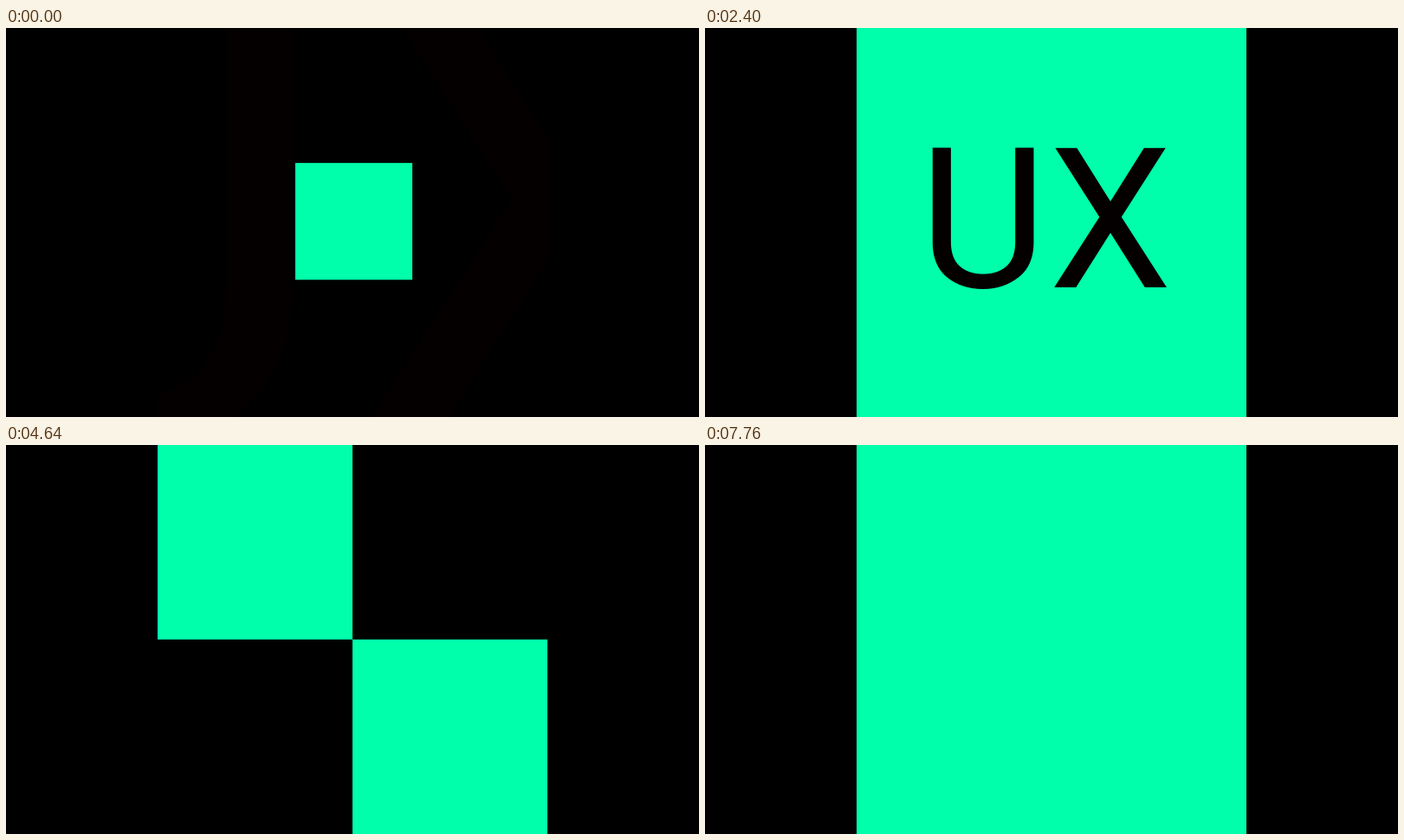
An HTML page for the animation above (8.16 s loop, 800 px wide and 450 px high).

```html
<!DOCTYPE html>
<html lang="da">
<head>
<meta charset="utf-8">
<title>UX</title>
<style>
  html, body { margin: 0; width: 100%; height: 100%; overflow: hidden; background: #000; }
  svg { display: block; width: 100vw; height: 100vh; }
  .title { font: 400 200px Roboto, sans-serif; text-anchor: middle; fill: #040000; }
  .word { font: 500 80px "Noto Sans", sans-serif; }
</style>
</head>
<body>
<svg viewBox="0 0 800 450">
  <clipPath id="stage"><rect x="175" width="450" height="450"/></clipPath>
  <g clip-path="url(#stage)">
    <rect id="square" fill="#00ffaa"/>
    <rect id="topRight"/>
    <rect id="bottomLeft"/>
    <text id="u" class="title" x="330" y="291.5">U</text>
    <text id="x" class="title" x="460.5" y="291.5">X</text>
    <text id="upper" class="word" y="143" text-anchor="end">Klik</text>
    <text id="lower" class="word" y="364" text-anchor="middle">nu</text>
  </g>
</svg>
<script>
const LOOP = 8160, GREEN = '#00ffaa', HALF = 225;
const el = id => document.getElementById(id);
const set = (id, attrs) => {
  for (const name in attrs) el(id).setAttribute(name, attrs[name]);
};
const progress = (t, start, length) => Math.min(1, Math.max(0, (t - start) / length));
const smooth = p => p * p * (3 - 2 * p);
const out = (p, power) => 1 - (1 - p) ** power;

function drawSquare(t) {
  const size = t < 2400 ? 135 + 0.1345 * t : 460;
  set('square', { x: 401.5 - size / 2, y: 223.7 - size / 2, width: size, height: size });
}

// Each letter shrinks around its own anchor, then slides out sideways.
function drawTitle(t) {
  const scale = 1 + 3.02 * (1 - smooth(progress(t, 0, 2750)));
  const slide = 245 * smooth(progress(t, 3690, 930));
  const display = t < 4620 ? 'inline' : 'none';
  const place = (id, anchor, dx) => set(id, {
    display,
    transform: `translate(${anchor + dx} 227) scale(${scale}) translate(${-anchor} -227)`
  });
  place('u', 399, -slide);
  place('x', 405, slide);
}

function drawQuadrants(t) {
  const size = HALF * smooth(progress(t, 3675, 950));
  const width = size * (1 - smooth(progress(t, 7400, 360)));
  set('topRight', { x: 400 + size - width, y: HALF - size, width, height: size });
  set('bottomLeft', { x: 400 - size, y: HALF, width, height: size });
}

// The words enter in black, then cross to the other column and turn green.
function drawWords(t) {
  const enter = HALF * (out(progress(t, 5000, 480), 3) - 1);
  const cross = HALF * out(progress(t, 6290, 790), 2);
  const display = t >= 5000 && t < 7760 ? 'inline' : 'none';
  set('upper', { x: 356 + enter + cross, fill: t < 6380 ? '#000' : GREEN, display });
  set('lower', { x: 505 - enter - cross, fill: t < 6420 ? '#000' : GREEN, display });
}

function frame() {
  const t = performance.now() % LOOP;
  drawSquare(t);
  drawTitle(t);
  drawQuadrants(t);
  drawWords(t);
  requestAnimationFrame(frame);
}
frame();
</script>
</body>
</html>
```
